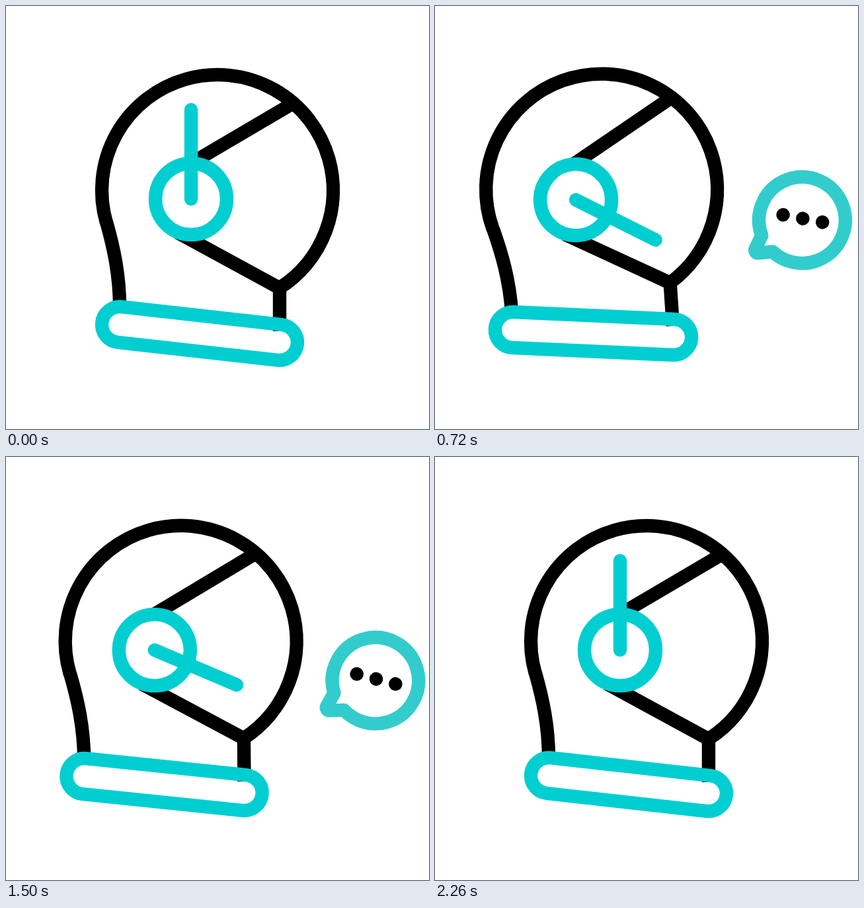
An HTML page with a canvas that plays this animation: 640 px wide and 640 px high, repeating every 2.4 s.

```html
<!DOCTYPE html>
<html lang="en">
<head>
<meta charset="utf-8">
<title>Helmet radio</title>
<style>
  html, body { margin: 0; width: 100%; height: 100%; overflow: hidden; background: #fff; }
  canvas { display: block; width: 100vmin; height: 100vmin; }
</style>
</head>
<body>
<canvas id="stage" width="640" height="640"></canvas>
<script>
const ctx = document.getElementById('stage').getContext('2d');
const LOOP = 2400, STEP = 20;
const CYAN = '#00ced1', BUBBLE = '#33cccc', RAD = Math.PI / 180;
const PIVOT = { x: 293, y: 495.5 };
const SWINGS = [-4, 3.5, -4, 5.3, 0], SWING_START = 347, SWING_TIME = 337;
const BUBBLE_DELAY = 837;

// Eased 0 to 1 between two times
function ramp(t, from, to) {
  const p = Math.min(1, Math.max(0, (t - from) / (to - from)));
  return (1 - Math.cos(Math.PI * p)) / 2;
}

const slide = t => -53.5 * (ramp(t, 0, 570) - ramp(t, 1680, 2260));
const micTurn = t =>
  120.5 * ramp(t, 0, 450) - 7.5 * ramp(t, 740, 1640) - 113 * ramp(t, 1820, 2260);

function tilt(t) {
  return SWINGS.reduce((angle, goal, i) => {
    const start = SWING_START + i * SWING_TIME;
    return angle + (goal - angle) * ramp(t, start, start + SWING_TIME);
  }, 0);
}

function stroke(color, cap, build) {
  ctx.strokeStyle = color;
  ctx.lineCap = cap;
  ctx.beginPath();
  build();
  ctx.stroke();
}

function line(x0, y0, x1, y1) {
  ctx.moveTo(x0, y0);
  ctx.lineTo(x1, y1);
}

function drawHelmet(micAngle) {
  stroke('#000', 'butt', () => {
    ctx.moveTo(172, 456);
    ctx.bezierCurveTo(172, 407, 163, 366, 152, 327);
    ctx.arc(320, 279, 175, Math.atan2(48, -168), Math.atan2(148, 94) + 2 * Math.PI);
    ctx.lineTo(260, 343);
  });
  stroke('#000', 'butt', () => line(414, 427, 414, 492));
  stroke('#000', 'butt', () => line(433, 148, 280, 238));

  const lean = Math.atan2(27, 242);
  stroke(CYAN, 'butt', () => {
    ctx.arc(172, 482, 27, lean + Math.PI / 2, lean + Math.PI * 1.5);
    ctx.arc(414, 509, 27, lean - Math.PI / 2, lean + Math.PI / 2);
    ctx.closePath();
  });
  stroke(CYAN, 'butt', () => ctx.arc(280, 292, 54, 0, 2 * Math.PI));

  const a = (micAngle - 90) * RAD;
  stroke(CYAN, 'round', () =>
    line(280, 292, 280 + 135 * Math.cos(a), 292 + 135 * Math.sin(a)));
}

// Rises steadily along a shallow bow while turning
function drawBubble(age, shift) {
  const alpha = ramp(age, 67, 260) - ramp(age, 1150, 1345);
  if (alpha <= 0) return;
  const y = 504 - 0.25 * age;
  const x = 555.5 + shift - (y - 318) ** 2 / 700;
  ctx.save();
  ctx.globalAlpha = alpha;
  ctx.translate(x, y);
  ctx.rotate((58.7 - 0.0668 * age) * RAD);
  stroke(BUBBLE, 'round', () => {
    ctx.arc(0, 0, 65.3, Math.atan2(34, -56), Math.atan2(55, -35) + 2 * Math.PI);
    ctx.arcTo(-63.5, 63.5, -56, 34, 4.5);
    ctx.closePath();
  });
  ctx.fillStyle = '#000';
  for (let i = -1; i <= 1; i++) {
    ctx.beginPath();
    ctx.arc(0.5 + 30.3 * i, -2.6, 10.3, 0, 2 * Math.PI);
    ctx.fill();
  }
  ctx.restore();
}

function draw(t) {
  ctx.fillStyle = '#fff';
  ctx.fillRect(0, 0, 640, 640);
  ctx.lineWidth = 20.4;
  ctx.lineJoin = 'round';
  ctx.save();
  ctx.translate(PIVOT.x + slide(t), PIVOT.y);
  ctx.rotate(tilt(t) * RAD);
  ctx.translate(-PIVOT.x, -PIVOT.y);
  drawHelmet(micTurn(t));
  ctx.restore();
  drawBubble(t, 0);
  drawBubble(t - BUBBLE_DELAY, 4);
}

const origin = performance.now();
function tick() {
  const t = (performance.now() - origin) % LOOP;
  draw(Math.floor(t / STEP) * STEP);
  requestAnimationFrame(tick);
}
tick();
</script>
</body>
</html>
```
